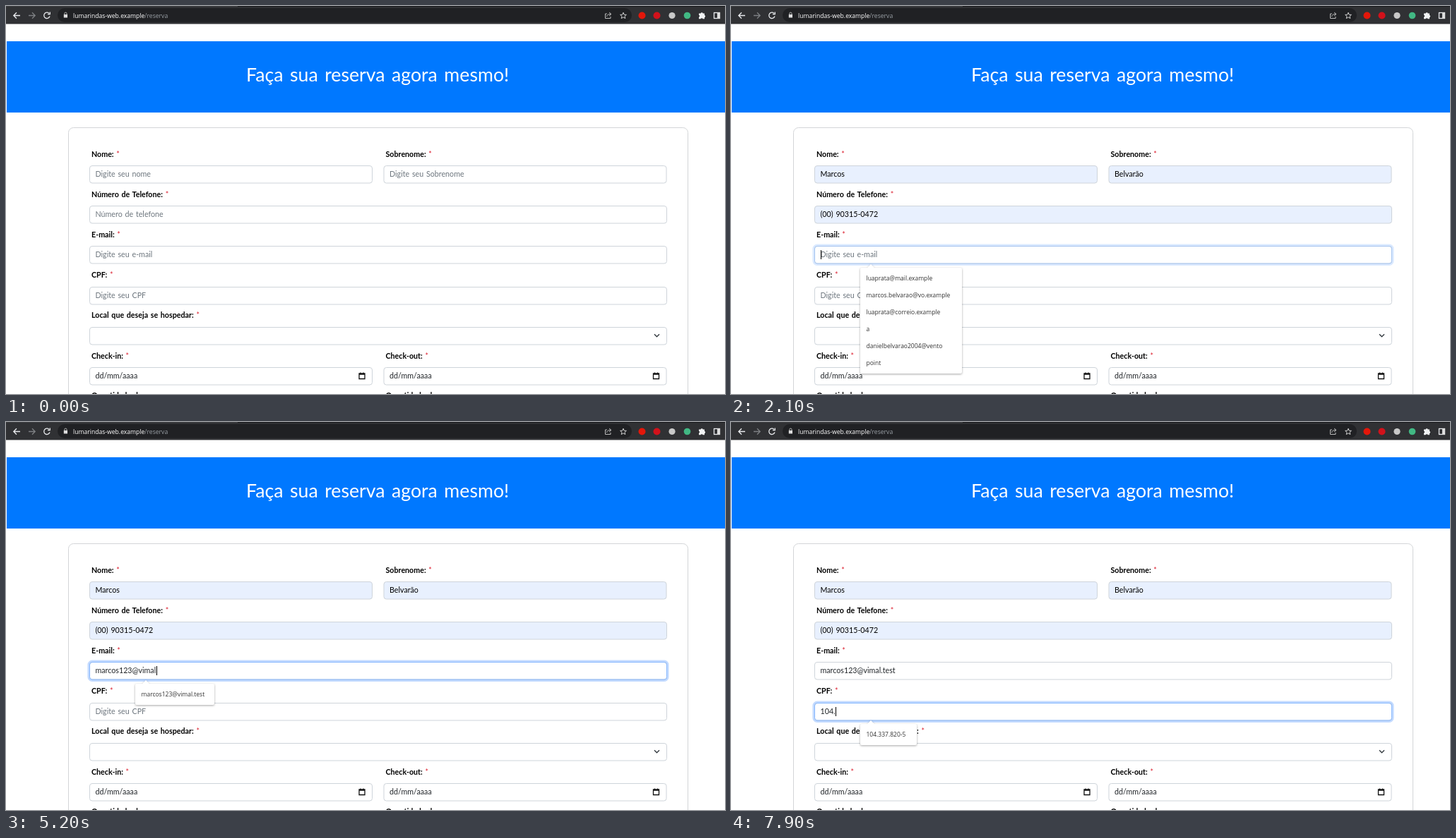
An HTML page for the animation above (8 s loop, 1018 by 550 pixels).

```html
<!DOCTYPE html>
<html lang="pt-BR">
<head>
<meta charset="utf-8">
<title>Reserva</title>
<style>
  html, body { margin: 0; width: 1018px; height: 550px; overflow: hidden; background: #fff; }
  svg { display: block; }
  text { font: 10.7px Lato, sans-serif; word-spacing: .1em; fill: #212529; white-space: pre; }
  .title { font-size: 26.7px; fill: #fff; }
  .label { font-weight: 700; fill: #000; }
  .star { font-weight: 400; fill: #dc2030; }
  .hint { fill: #6c757d; }
  .filled { fill: #000; }
  .preview { font: 9px "Liberation Sans", Arial, sans-serif; fill: #111; }
  .menu { font: 8.5px "Open Sans", sans-serif; word-spacing: 0; fill: #333; }
  .small { font-size: 7.75px; }
  .muted { fill: #777; }
  .url { font: 8.6px "Open Sans", sans-serif; fill: #fff; }
  .popup { filter: drop-shadow(0 1px 1.5px rgba(0, 0, 0, .35)); }
  .line { fill: none; stroke: #e8eaed; stroke-width: 1.3; }
</style>
</head>
<body>
<svg width="1018" height="550" viewBox="0 0 1018 550">
  <rect width="1018" height="25.5" fill="#303134"/>
  <path d="M0 0H1018V1H0Z" fill="#17181a"/>
  <path d="M0 0H328V1H0Z" fill="#3c3d40"/>
  <rect x="73" y="3" width="813" height="20" rx="10" fill="#202124"/>
  <g class="line">
    <path d="M20 13.5H11M15 9.3L10.8 13.5L15 17.7"/>
    <path d="M32 13.5H41M37 9.3L41.2 13.5L37 17.7" stroke="#7d7f83"/>
    <path d="M61 10.4A4.2 4.2 0 1 0 62 14.5M62.3 8.5V11.7H59"/>
    <path d="M82.8 12V10.7A1.6 1.6 0 0 1 86 10.7V12" stroke="#bbb" stroke-width="1"/>
    <path d="M851 11H848.5V17.5H856V15M850.5 15Q851 11.5 856 11.5M854 9L857 11.5L854 14" stroke="#bbb" stroke-width="1"/>
    <path d="M874 9.2L875.2 12.2L878.4 12.4L876 14.5L876.8 17.6L874 15.9L871.2 17.6L872 14.5L869.6 12.4L872.8 12.2Z" stroke="#ccc" stroke-width="1"/>
    <rect x="1002.5" y="9.5" width="8" height="8"/>
  </g>
  <path d="M81.8 12H87V16.5H81.8ZM1007 9H1011V18H1007Z" fill="#ddd"/>
  <path d="M981 10.5H983.5A1.7 1.7 0 0 1 986.8 10.5H989V13A1.7 1.7 0 0 1 989 16.2V18.3H986.7A1.7 1.7 0 0 0 983.5 18.3H981V15.8A1.6 1.6 0 0 0 981 12.8Z" fill="#f1f3f4"/>
  <circle cx="900.5" cy="13.5" r="5" fill="#e3170a"/>
  <circle cx="921.5" cy="13.5" r="5" fill="#d1121b"/>
  <circle cx="943" cy="13.5" r="4.6" fill="#c8c8c8"/>
  <circle cx="964.5" cy="13.5" r="4.8" fill="#41b883"/>
  <text class="url" x="95" y="16.7">lumarindas-web.example<tspan fill="#9aa0a6">/reserva</tspan></text>
  <rect x="1" y="50" width="1017" height="101" fill="#0078ff"/>
  <text class="title" x="340" y="107">Faça sua reserva agora mesmo!</text>
  <rect x="88.5" y="172.5" width="877" height="420" rx="7" fill="#fff" stroke="#d3d5d8"/>
  <g id="form"></g>
</svg>
<script>
const LOOP = 8000, STEP = 100;
const LEFT = 118.5, RIGHT = 535, HALF = 400, FULL = 817;
const FIRST = 'Marcos', LAST = 'Belvarão', RAW_PHONE = '00903150472', PHONE = '(00) 90315-0472';
const EMAIL = 'marcos123@vimal.test', LONG_EMAIL = 'marcos.belvarao@vo.example', CPF = '104.337.820-5';
const ALL_EMAILS = ['luaprata@mail.example', LONG_EMAIL, 'luaprata@correio.example', 'a',
  'danielbelvarao2004@vento', 'point'];

// [time, number of characters typed]
const EMAIL_KEYS = [[3000, 1], [3100, 2], [3200, 3], [3300, 4], [3400, 6], [3600, 8], [3800, 9],
  [4500, 10], [4800, 11], [4900, 12], [5000, 14], [5200, 15], [5500, 16], [5600, 17], [5700, 18], [5800, 20]];
const CPF_KEYS = [[7700, 1], [7800, 2], [7900, 4]];

const form = document.getElementById('form');
const clamp = v => Math.max(0, Math.min(1, v));
const within = (t, from, to) => t >= from && t < to;
const rowY = row => Math.round(226 + 57.2 * row) + .5;
const typed = (text, keys, t) => text.slice(0, keys.reduce((n, [at, count]) => t >= at ? count : n, 0));
const text = (x, y, cls, str) => `<text class="${cls}" x="${x}" y="${y}">${str}</text>`;

function label(x, row, str) {
  return text(x + 2.5, 213.5 + 57.2 * row, 'label', `${str} <tspan class="star">*</tspan>`);
}

function field(x, row, width, { value = '', hint = '', cls = 'filled', auto, ring = 0, caret } = {}) {
  const y = rowY(row), box = `x="${x}" y="${y}" width="${width}" height="24.5" rx="3.5"`;
  return `<rect ${box} fill="none" stroke="#0d6efd" stroke-opacity="${.25 * ring}" stroke-width="6"/>
    <rect ${box} fill="${auto ? '#e8f0fe' : '#fff'}" stroke="#ced4da"/>
    <rect ${box} fill="none" stroke="#86b7fe" stroke-opacity="${ring}"/>
    <g ${caret ? `data-caret="${caret}"` : ''}>${text(x + 8, y + 15.5, value ? cls : 'hint', value || hint)}</g>`;
}

function dateField(x) {
  const y = rowY(5);
  return field(x, 5, HALF, { value: 'dd/mm/aaaa', cls: '' }) +
    `<path d="M${x + 381.5} ${y + 8.5}h8v7.5h-8zM${x + 381.5} ${y + 9.5}h8M${x + 383.5} ${y + 7}v2M${x + 387.5} ${y + 7}v2"
      fill="none" stroke="#111" stroke-width="1.3"/>`;
}

function popup(y, width, height, content, opacity = 1) {
  return `<g opacity="${opacity}"><path class="popup" fill="#fff"
    d="M185 ${y}H193L198 ${y - 5}L203 ${y}H${181 + width}q2 0 2 2V${y + height - 2}q0 2 -2 2H185q-2 0 -2 -2V${y + 2}q0 -2 2 -2Z"/>
    ${content}</g>`;
}

const list = (y, width, items, opacity) => popup(y, width, 24 * items.length + 6,
  items.map((item, i) => text(191.5, y + 18 + 24 * i, 'menu', item)).join(''), opacity);

function contactPopup(t) {
  return popup(260, 104, 71, `
    ${t >= 1200 ? '<path d="M183 260H287V298.5H183Z" fill="#e8e8e8"/>' : ''}
    <path d="M183 301.5H287" stroke="#e4e4e4"/>
    <g fill="none" stroke="#555"><circle cx="196.5" cy="279.5" r="4"/>
    <circle cx="196.5" cy="278.3" r="1.3"/><path d="M193.8 282.3Q196.5 279.8 199.2 282.3"/></g>
    <circle cx="196.5" cy="316.5" r="4.3" fill="#5f6368"/>
    ${text(210, 275, 'menu', FIRST)}${text(210, 289, 'menu small', PHONE)}
    ${text(210, 319.5, 'menu muted', 'Gerenciar...')}`, clamp(1 - (t - 1400) / 300));
}

function popups(t) {
  if (within(t, 1000, 1700)) return contactPopup(t);
  if (within(t, 2100, 3000)) return list(371, 144, ALL_EMAILS);
  if (within(t, 3000, 3600)) return list(371, 144, [LONG_EMAIL, EMAIL]);
  if (within(t, 3600, 5900)) return list(371, 112, [EMAIL], t < 5800 ? 1 : .5);
  if (within(t, 7600, 7900)) return list(428, 80, [CPF, '10458260317', '109.264.538-1']);
  return t >= 7900 ? list(428, 80, [CPF]) : '';
}

function draw(t) {
  const auto = t >= 1200, accepted = t >= 1500, cls = accepted ? 'filled' : 'preview';
  const personal = value => ({ value: auto ? value : '', auto, cls });
  const nameRing = t < 2100 ? clamp((t - 900) / 300) : 0;
  const emailRing = t < 7200 ? clamp((t - 1980) / 200) : clamp((7400 - t) / 200);
  const emailCaret = within(t, 2100, 7200) &&
    ![[2600, 3000], [4200, 4500], [6200, 6700]].some(([a, b]) => within(t, a, b));

  form.innerHTML =
    label(LEFT, 0, 'Nome:') + label(RIGHT, 0, 'Sobrenome:') +
    field(LEFT, 0, HALF, { ...personal(FIRST), hint: 'Digite seu nome', ring: nameRing,
      caret: within(t, 1000, 2100) && (accepted ? 'end' : 'start') }) +
    field(RIGHT, 0, HALF, { ...personal(LAST), hint: 'Digite seu Sobrenome' }) +
    label(LEFT, 1, 'Número de Telefone:') +
    field(LEFT, 1, FULL, { ...personal(accepted ? PHONE : RAW_PHONE), hint: 'Número de telefone' }) +
    label(LEFT, 2, 'E-mail:') +
    field(LEFT, 2, FULL, { value: typed(EMAIL, EMAIL_KEYS, t), cls: '', hint: 'Digite seu e-mail', ring: emailRing,
      caret: emailCaret && (t < 3000 ? 'start' : 'end') }) +
    label(LEFT, 3, 'CPF:') +
    field(LEFT, 3, FULL, { value: typed(CPF, CPF_KEYS, t), cls: '', hint: 'Digite seu CPF', ring: clamp((t - 7500) / 200),
      caret: t >= 7600 && (t < 7700 ? 'start' : 'end') }) +
    label(LEFT, 4, 'Local que deseja se hospedar:') + field(LEFT, 4, FULL) +
    '<path d="M918 465.3L921.5 468.8L925 465.3" fill="none" stroke="#343a40" stroke-width="1.4"/>' +
    label(LEFT, 5, 'Check-in:') + label(RIGHT, 5, 'Check-out:') + dateField(LEFT) + dateField(RIGHT) +
    text(121, 556, 'label', 'Quantidade de') + text(537.5, 556, 'label', 'Quantidade de') +
    popups(t);

  for (const group of form.querySelectorAll('[data-caret]')) {
    const node = group.firstChild, y = +node.getAttribute('y') - 10;
    const x = +node.getAttribute('x') + (group.dataset.caret === 'end' ? node.getComputedTextLength() : 0);
    group.innerHTML += `<rect x="${Math.round(x + .4)}" y="${y}" width="1" height="13" fill="#000"/>`;
  }
}

let shown = -1;
function tick() {
  const t = Math.floor(performance.now() % LOOP / STEP) * STEP;
  if (t !== shown) draw(shown = t);
  requestAnimationFrame(tick);
}
tick();
</script>
</body>
</html>
```
